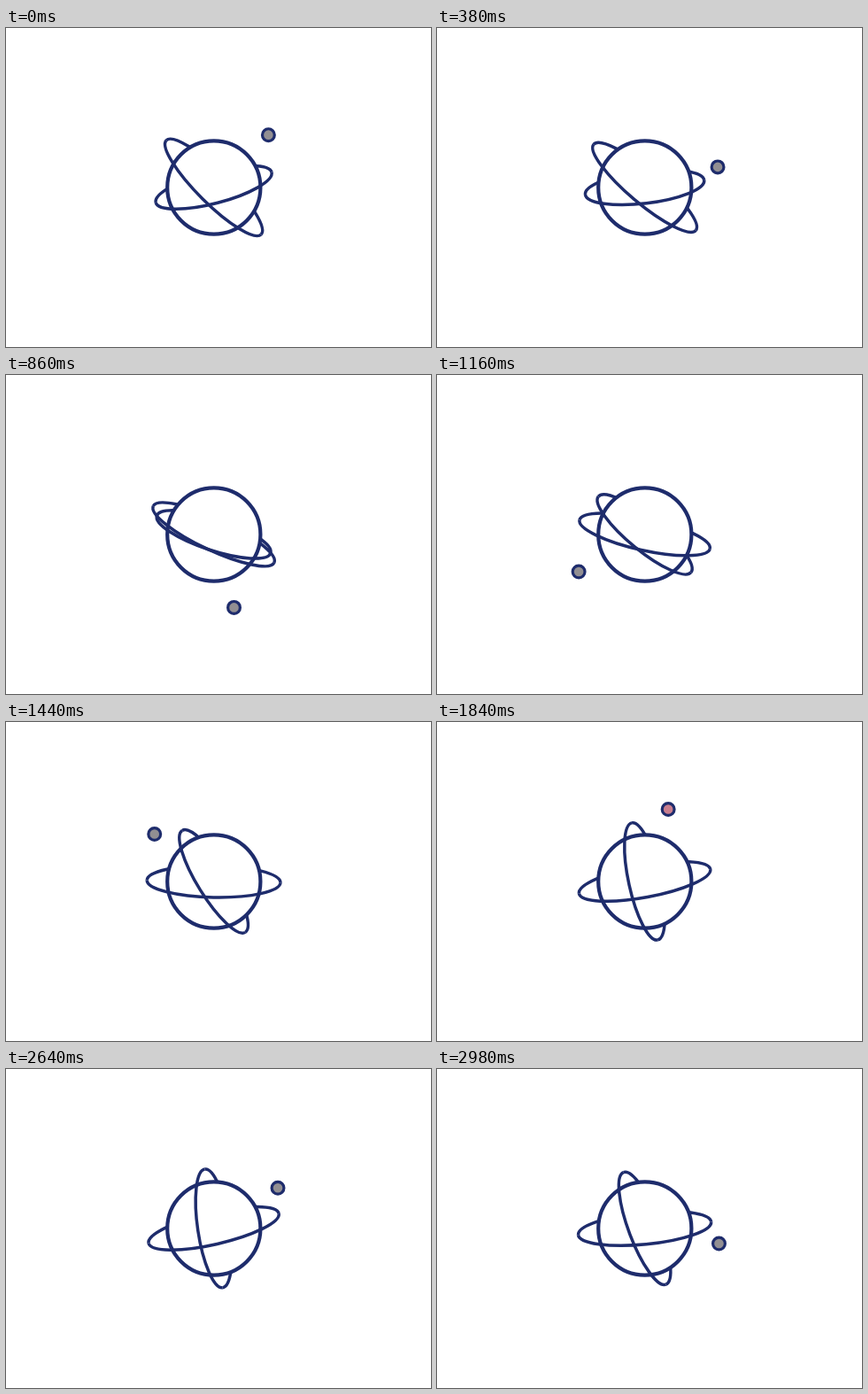
Recreate the animation shown at these times as an HTML page. Size 480 px wide and 360 px high, loop 3 s.

```html
<!DOCTYPE html>
<html lang="en">
<head>
<meta charset="utf-8">
<title>Planet with rings</title>
<style>
  html, body { margin: 0; width: 100%; height: 100%; overflow: hidden; background: #fff; }
  svg { display: block; width: 100vw; height: 100vh; }
</style>
</head>
<body>
<svg viewBox="0 0 480 360" fill="none" stroke="#1e2c6c">
  <g class="wide" stroke-width="3.5"><path d="M-75.4 0A75.4 18 0 0 1 75.4 0"/></g>
  <g class="narrow" stroke-width="3.5"><path d="M-67.6 0A67.6 18 0 0 1 67.6 0"/></g>
  <circle cx="234.8" cy="180" r="52.6" fill="#fff" stroke-width="4.2"/>
  <g class="wide" stroke-width="3.5"><path d="M-75.4 0A75.4 18 0 0 0 75.4 0"/></g>
  <g class="narrow" stroke-width="3.5"><path d="M-67.6 0A67.6 18 0 0 0 67.6 0"/></g>
  <circle id="moon" r="6.9" stroke-width="3.2"/>
</svg>
<script>
const LOOP = 3000, STEP = 20, LEAD = 100, SWING = 2400, HOLD = 20;
const CENTER = { x: 234.6, y: 179.9 }, ORBIT = 85.6;
const GRAY = [146, 143, 146], PINK = [201, 126, 143];
const moon = document.getElementById('moon');

const lerp = (a, b, k) => a + (b - a) * k;

// cubic-bezier(.42, 0, .58, 1), solved by bisection
function easeInOut(x) {
  let low = 0, high = 1;
  for (let i = 0; i < 24; i++) {
    const u = (low + high) / 2;
    if (1.26 * u - 0.78 * u * u + 0.52 * u ** 3 < x) low = u;
    else high = u;
  }
  return low * low * (3 - 2 * low);
}

function turn(name, degrees) {
  for (const half of document.getElementsByClassName(name)) {
    half.setAttribute('transform', `translate(${CENTER.x} ${CENTER.y}) rotate(${degrees})`);
  }
}

function draw(time) {
  const clock = time + LEAD, period = SWING + HOLD;
  const progress = easeInOut(Math.min(1, (clock % period) / SWING));
  const swing = Math.floor(clock / period) % 2 ? 1 - progress : progress;
  turn('wide', lerp(45, -15, swing));
  turn('narrow', lerp(-15, 85, swing));

  const angle = lerp(-45, 315, progress) * Math.PI / 180;
  moon.setAttribute('cx', CENTER.x + ORBIT * Math.cos(angle));
  moon.setAttribute('cy', CENTER.y + ORBIT * Math.sin(angle));
  const blush = Math.min(1, Math.max(0, 2 - Math.abs(time - 1840) / 110));
  moon.setAttribute('fill', `rgb(${GRAY.map((c, i) => Math.round(lerp(c, PINK[i], blush)))})`);
}

const start = performance.now();
function tick() {
  const time = (performance.now() - start) % LOOP;
  draw(Math.floor(time / STEP) * STEP);
  requestAnimationFrame(tick);
}
tick();
</script>
</body>
</html>
```
